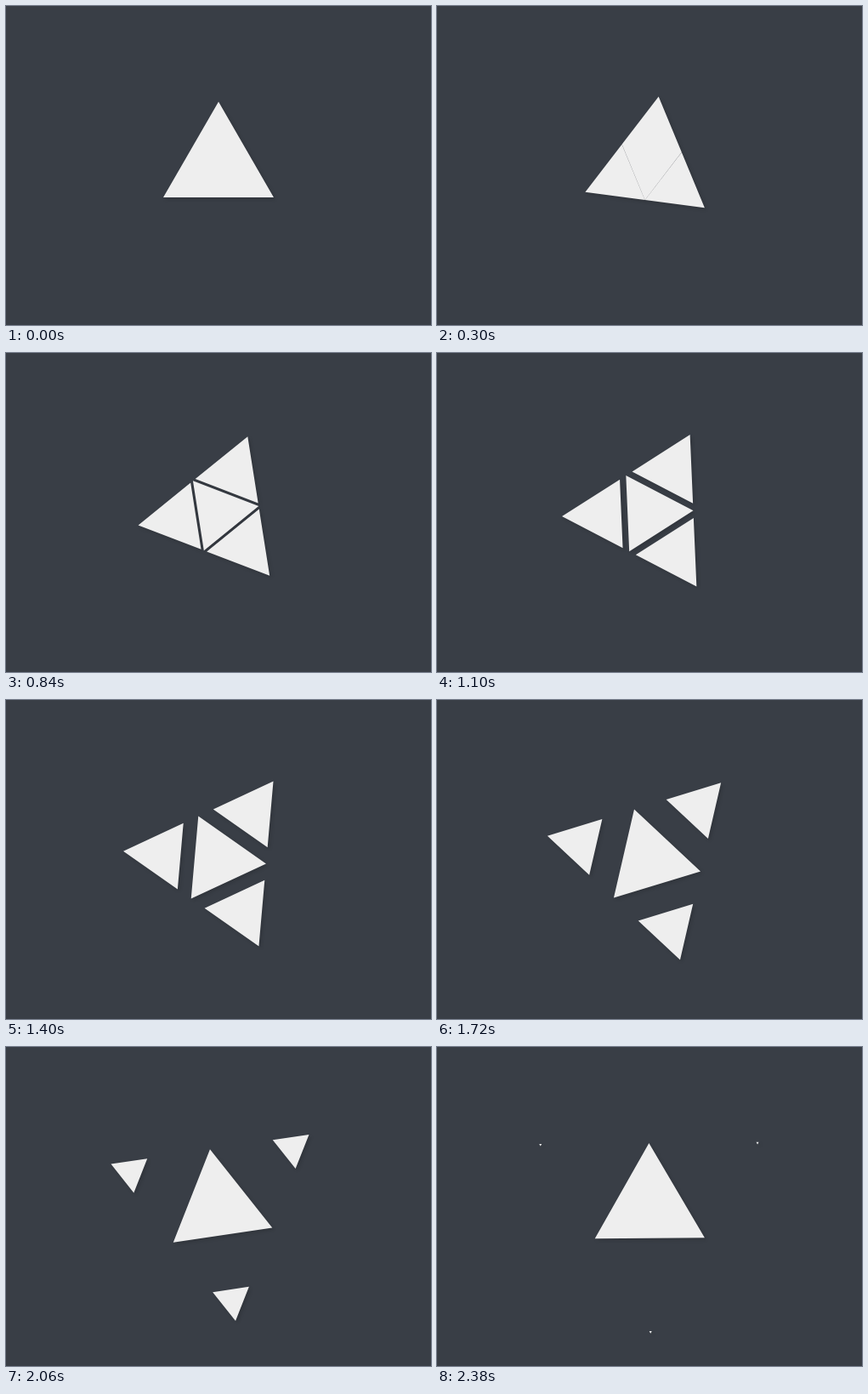
An HTML page with a canvas that plays this animation: 500x375 px, repeating every 2400 ms.

```html
<!DOCTYPE html>
<html lang="en">
<head>
<meta charset="utf-8">
<title>Triangle zoom</title>
<style>
  html, body { margin: 0; width: 100%; height: 100%; overflow: hidden; background: #393e46; }
  canvas { display: block; }
</style>
</head>
<body>
<canvas id="stage" width="500" height="375"></canvas>
<script>
const LOOP = 2400;
const THIRD = Math.PI * 2 / 3;
const ctx = document.getElementById('stage').getContext('2d');

// Adds an equilateral triangle to the path; angle points at its first corner.
function triangle(x, y, radius, angle) {
  for (let i = 0; i < 3; i++) {
    const a = angle + i * THIRD;
    ctx.lineTo(x + radius * Math.cos(a), y + radius * Math.sin(a));
  }
  ctx.closePath();
}

function addTriangle(x, y, radius, angle) {
  ctx.moveTo(x + radius * Math.cos(angle), y + radius * Math.sin(angle));
  triangle(x, y, radius, angle);
}

function draw(now) {
  const p = (now % LOOP) / LOOP;
  const turn = p * Math.PI / 3;
  const inner = 37.5 * 2 ** p;
  const outer = inner * (1 - p ** 3);
  const distance = 2 * inner - outer; // the outermost corner stays fixed while shrinking

  ctx.shadowColor = 'transparent';
  ctx.fillStyle = '#393e46';
  ctx.fillRect(0, 0, 500, 375);

  ctx.beginPath();
  addTriangle(250, 187.5, inner, turn + Math.PI / 2);
  for (let i = 0; i < 3; i++) {
    const a = turn - Math.PI / 2 + i * THIRD;
    addTriangle(250 + distance * Math.cos(a), 187.5 + distance * Math.sin(a), outer, a);
  }
  ctx.shadowColor = 'rgba(0, 0, 0, 0.16)';
  ctx.shadowBlur = 4;
  ctx.shadowOffsetX = ctx.shadowOffsetY = 2;
  ctx.fillStyle = '#eee';
  ctx.fill();
}

const start = performance.now();
function tick() {
  draw(performance.now() - start);
  requestAnimationFrame(tick);
}
tick();
</script>
</body>
</html>
```
